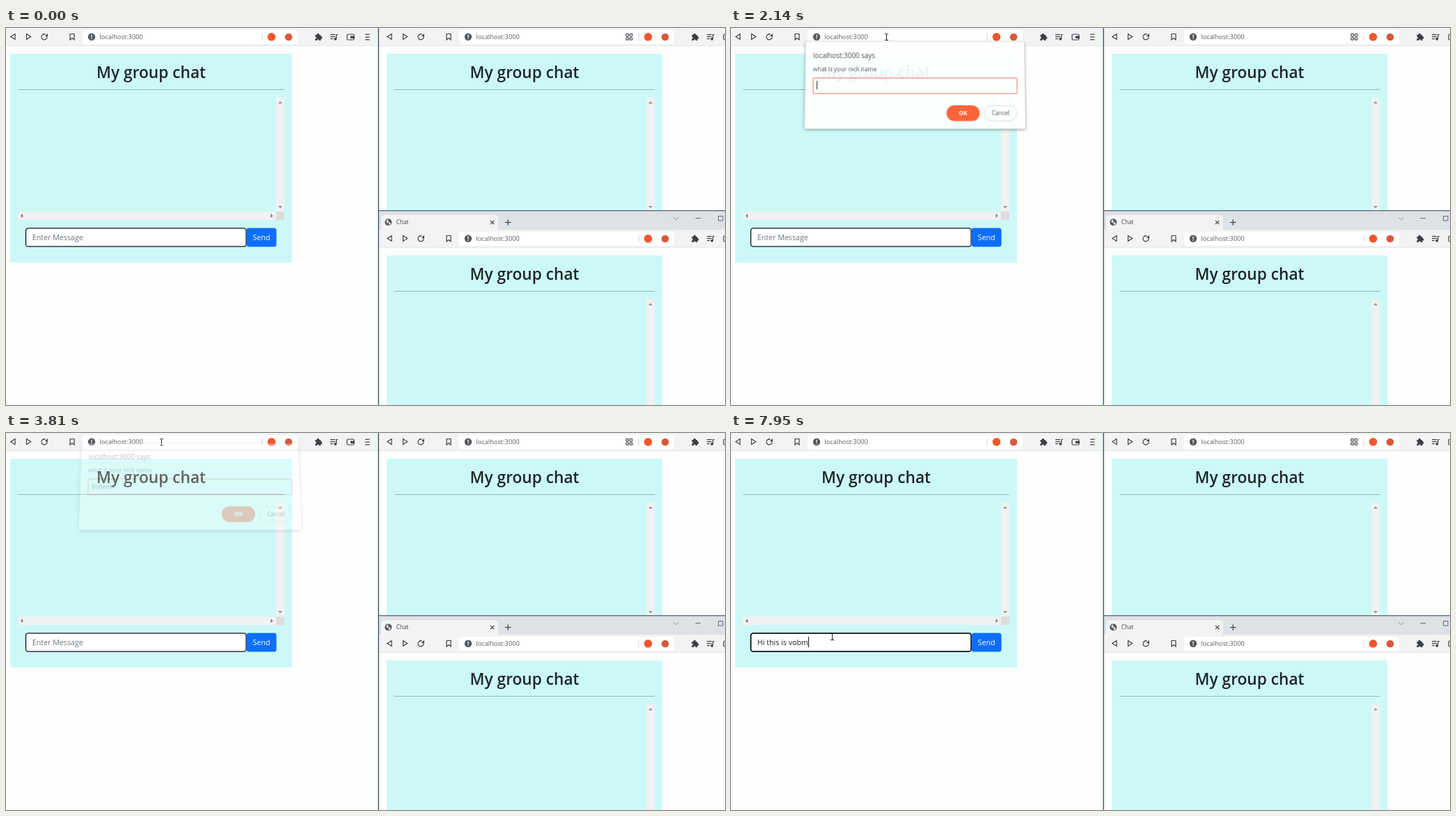
Recreate the animation shown at these times as an HTML page with a canvas. Size 1033 by 542 pixels, loop 8 s.

```html
<!DOCTYPE html>
<html lang="en">
<head>
<meta charset="utf-8">
<title>Group chat</title>
<style>
  html, body { margin: 0; width: 100%; height: 100%; overflow: hidden; background: #fefefe; }
  canvas, svg { position: absolute; left: 0; top: 0; display: block; }
  #dialog { transform-origin: 264px 86px; visibility: hidden; font-family: "Open Sans", "Noto Sans", sans-serif; }
  #panel { filter: drop-shadow(0 1px 2px rgba(0, 0, 0, .45)); }
</style>
</head>
<body>
<canvas id="stage" width="1033" height="542"></canvas>
<svg id="dialog" width="1033" height="542">
  <rect id="panel" x="106.5" y="23.5" width="315.5" height="125" rx="1.5" fill="#fff"/>
  <text x="117.5" y="47" font-size="9.9" fill="#3c4043">localhost:3000 says</text>
  <text x="117.5" y="66.5" font-size="8.57" fill="#505357">what is your nick name</text>
  <rect x="118" y="75.8" width="293" height="22.4" rx="1.5" fill="#fff" stroke="#f29a84" stroke-width="1.4"/>
  <text id="nick" x="123.3" y="90" font-size="8.6" fill="#303236"></text>
  <rect id="nickCaret" x="123" y="80" width="1" height="12" fill="#222"/>
  <rect x="309.5" y="115" width="47.5" height="22.5" rx="11.2" fill="#ff5a2c"/>
  <text x="333.2" y="129.3" font-size="8.3" font-weight="700" fill="#fff" text-anchor="middle">OK</text>
  <rect x="363.5" y="115.5" width="47" height="21.5" rx="10.7" fill="#fff" stroke="#d9dbe0"/>
  <text x="386.8" y="129.2" font-size="8.2" fill="#44474c" text-anchor="middle">Cancel</text>
</svg>
<script>
const LOOP = 8000;
const FAMILY = '"Open Sans", "Noto Sans", sans-serif';
const ctx = document.getElementById('stage').getContext('2d');
const [dialog, nick, nickCaret] = ['dialog', 'nick', 'nickCaret'].map(id => document.getElementById(id));

// Pointer moves: start, end, number of steps, way points.
const moves = [
  [190, 360, 4, [[1020, 545], [839, 440], [480, 222], [345, 139]]],
  [560, 1060, 11, [[345, 139], [404, 70], [340, 16], [126, 10], [223, 13]]],
  [4280, 4850, 12, [[223, 13], [190, 130], [145, 293]]]
];
const clicks = [[1540, 1740], [5050, 5250]];

const nickKeys = [2850, 3170, 3220, 3370, 3460];
const nickName = 'Vobem';
const messageKeys = [5510, 5710, 5810, 6060, 6140, 6230, 6310, 6390, 6480, 6560, 6640,
  6830, 6830, 6930, 7130, 7200, 7450];
const message = 'Hi this is vobm  ';
const eraseKeys = [7850, 7950];

const within = (t, [a, b]) => t >= a && t < b;
const pressed = (keys, t) => keys.filter(k => t >= k).length;

function rect(x, y, w, h, color) {
  ctx.fillStyle = color;
  ctx.fillRect(x, y, w, h);
}

function round(x, y, w, h, r, fill, stroke, width = 1) {
  ctx.beginPath();
  ctx.roundRect(x, y, w, h, r);
  if (fill) { ctx.fillStyle = fill; ctx.fill(); }
  if (stroke) { ctx.strokeStyle = stroke; ctx.lineWidth = width; ctx.stroke(); }
}

function disc(x, y, r, color) {
  ctx.beginPath();
  ctx.arc(x, y, r, 0, Math.PI * 2);
  ctx.fillStyle = color;
  ctx.fill();
}

function line(points, color = '#3c3f44', width = 1.2, close) {
  ctx.beginPath();
  points.forEach(([x, y]) => ctx.lineTo(x, y));
  if (close) ctx.closePath();
  ctx.strokeStyle = color;
  ctx.lineWidth = width;
  ctx.stroke();
}

function setFont(size, weight = 400) {
  ctx.font = `${weight} ${size}px ${FAMILY}`;
}

function text(str, x, y, size, color, weight, align = 'left') {
  setFont(size, weight);
  ctx.textAlign = align;
  ctx.fillStyle = color;
  ctx.fillText(str, x, y);
}

function widthOf(str, size) {
  setFont(size);
  return ctx.measureText(str).width;
}

// Small filled triangle pointing along (dx, dy).
function arrow(x, y, dx, dy, color) {
  ctx.beginPath();
  ctx.moveTo(x + dx * 1.6, y + dy * 1.6);
  ctx.lineTo(x - dx * 1.6 + dy * 3, y - dy * 1.6 + dx * 3);
  ctx.lineTo(x - dx * 1.6 - dy * 3, y - dy * 1.6 - dx * 3);
  ctx.fillStyle = color;
  ctx.fill();
}

function reloadIcon(x, y) {
  ctx.beginPath();
  ctx.arc(x, y, 4, -0.7, Math.PI * 1.85 - 0.7, false);
  ctx.strokeStyle = '#3c3f44';
  ctx.lineWidth = 1.3;
  ctx.stroke();
  ctx.beginPath();
  ctx.moveTo(x + 4.8, y - 5);
  ctx.lineTo(x + 4.8, y - 0.8);
  ctx.lineTo(x + 0.8, y - 0.8);
  ctx.fillStyle = '#3c3f44';
  ctx.fill();
}

function cross(x, y, r) {
  line([[x - r, y - r], [x + r, y + r]]);
  line([[x + r, y - r], [x - r, y + r]]);
}

function puzzleIcon(x, y) {
  rect(x - 4.5, y - 3, 8, 8, '#3c3f44');
  disc(x - 0.5, y - 3.3, 1.9, '#3c3f44');
  disc(x + 3.6, y + 1, 1.9, '#3c3f44');
  disc(x - 4.4, y + 1, 1.4, '#f3f3f3');
  disc(x - 0.5, y + 4.9, 1.4, '#f3f3f3');
}

function playlistIcon(x, y) {
  line([[x - 5, y - 3.5], [x + 2, y - 3.5]]);
  line([[x - 5, y - 0.5], [x + 2, y - 0.5]]);
  line([[x - 5, y + 2.5], [x - 1, y + 2.5]]);
  line([[x + 6, y - 3.5], [x + 3.6, y - 3.5], [x + 3.6, y + 2.5]]);
  disc(x + 2.2, y + 2.8, 1.9, '#3c3f44');
}

function codeIcon(x, y) {
  for (const sx of [-1, 1]) for (const sy of [-1, 1]) {
    round(x + sx * 2.7 - 1.7, y + sy * 2.7 - 1.7, 3.4, 3.4, 0.5, null, '#55585d', 1.3);
  }
}

function toolbar(dx, dy, opts = {}) {
  ctx.save();
  ctx.translate(dx, dy);
  rect(-5, 0, 540, 26, '#f3f3f3');
  rect(-5, 25, 540, 1, '#e6e7e8');
  round(110, 3, 309, 20, 4, '#fff');
  line([[13, 8.5], [6.8, 12.5], [13, 16.5]], '#3c3f44', 1.2, true);
  line([[29.5, 8.5], [35.7, 12.5], [29.5, 16.5]], '#3c3f44', 1.2, true);
  if (opts.loading) cross(55, 12.7, 3.4); else reloadIcon(55, 12.8);
  line([[92, 8.5], [98, 8.5], [98, 17], [95, 14.6], [92, 17]], '#3c3f44', 1.2, true);
  disc(123, 12.8, 5.2, '#55585d');
  rect(122.4, 9.6, 1.3, 4, '#fff');
  rect(122.4, 14.6, 1.3, 1.3, '#fff');
  text('localhost:3000', 134.3, 16.4, 9.27, '#5a5d62');
  if (opts.code) codeIcon(354.3, 12.8);
  rect(367.5, 8, 1, 10, '#cfd1d4');
  disc(381.5, 12.8, 5.8, '#f4562c');
  disc(406, 13, 5.3, '#d9583a');
  puzzleIcon(448.8, 13);
  playlistIcon(471, 13);
  round(490, 9, 10, 8, 1.5, null, '#3c3f44', 1.2);
  rect(495, 11.5, 5.6, 3.4, '#3c3f44');
  for (const y of [8.6, 12.4, 16.2]) rect(516, y, 6.5, 1.2, '#3c3f44');
  ctx.restore();
}

function card(x, y, w, h) {
  rect(x, y, w, h, '#ccf9f8');
  text('My group chat', x + w / 2, y + 35, 22.7, '#212529', 600, 'center');
  rect(x + 11, y + 51, w - 22, 1, '#95b8b9');
  const bar = x + w - 23;
  rect(bar, y + 63, 12, 164, '#f1f1f1');
  arrow(bar + 6, y + 70, 0, -1, '#8c8c8c');
  arrow(bar + 6, y + 220.5, 0, 1, '#8c8c8c');
}

function form(t) {
  rect(17, 264, 371, 12, '#f1f1f1');
  rect(388, 264, 12, 12, '#dcdcdc');
  arrow(22.5, 270, -1, 0, '#7d7d7d');
  arrow(382, 270, 1, 0, '#7d7d7d');

  const focus = t >= 5050;
  round(28.5, 287.8, 316.5, 26.4, 3.5, '#fff', '#0c1214', focus ? 1.8 : 1.3);
  round(345.5, 287.5, 43, 27, 3.5, '#0d6efd');
  text('Send', 367, 305.3, 10.7, '#fff', 400, 'center');

  const count = pressed(messageKeys, t) - pressed(eraseKeys, t);
  const typed = message.slice(0, count);
  if (typed) text(typed, 37.8, 305.3, 10.7, '#212529');
  else text('Enter Message', 37.8, 305.3, 10.7, '#6c757d');
  if (focus) rect(Math.round(37.8 + widthOf(typed, 10.7)), 293, 1, 15, '#111');
  if (typed.endsWith(' ') && t > 7000) {
    const from = 37.8 + widthOf('Hi this is ', 10.7);
    const to = 37.8 + widthOf(message.trim(), 10.7);
    const wave = [];
    for (let x = from, i = 0; x < to; x += 1.5, i++) wave.push([x, 306.5 + (i % 2)]);
    line(wave, '#e0564f', 0.8);
  }
}

function tabStrip() {
  rect(536, 263, 497, 27, '#dee1e6');
  round(539, 269, 168, 22, [5, 5, 0, 0], '#f3f3f3');
  disc(549.3, 279.3, 5, '#55585d');
  arrow(547.5, 278, -1, 0, '#e9e9ea');
  arrow(551.5, 281, 1, 0, '#e9e9ea');
  text('Chat', 560.8, 282.3, 8.2, '#44474c');
  cross(698.7, 279.5, 2.7);
  line([[717, 279.5], [725.5, 279.5]]);
  line([[721.3, 275.2], [721.3, 283.8]]);
  line([[959, 272], [962.7, 275.7], [966.4, 272]], '#888b90', 1);
  line([[990.5, 273.5], [998, 273.5]], '#66696e', 1);
  round(1023.5, 270.5, 6.5, 6.5, 0, null, '#66696e');
}

function windows(t) {
  rect(0, 0, 1033, 542, '#fefefe');
  toolbar(0, 0, { loading: within(t, [1790, 1940]) });
  card(6, 37, 405, 300);
  form(t);

  rect(536, 0, 497, 262, '#fefefe');
  toolbar(541, 0, { code: true });
  card(547, 37, 396, 225);

  rect(536, 262, 497, 280, '#fefefe');
  tabStrip();
  toolbar(541, 290);
  card(547, 327, 396, 215);
  rect(534.5, 0, 1.5, 542, '#48626b');
  rect(535, 262, 498, 1.2, '#48626b');
}

function along(points, s) {
  const p = Math.min(s, 1) * (points.length - 1);
  const i = Math.min(Math.floor(p), points.length - 2);
  const [a, b] = [points[i], points[i + 1]];
  return a.map((v, k) => v + (b[k] - v) * (p - i));
}

function pointerAt(t) {
  const move = moves.filter(m => t >= m[0]).pop();
  if (!move) return null;
  const [start, end, steps, points] = move;
  const step = Math.min(steps, 1 + Math.floor((t - start) / (end - start) * (steps - 1) + 1e-6));
  const s = step / steps;
  return along(points, steps > 4 ? s * s * (3 - 2 * s) : 0.2 + 0.8 * s);
}

function overText(x, y) {
  return (y < 24 && x > 111 && x < 368) ||
    (y > 51 && y < 76 && x > 130 && x < 287) ||
    (y > 287 && y < 315 && x > 28 && x < 345);
}

function pointer(t) {
  const at = pointerAt(t);
  if (!at) return;
  const [x, y] = at.map(Math.round);
  if (clicks.some(c => within(t, c))) disc(x - 0.7, y - 0.3, 8.4, 'rgba(255, 242, 60, .8)');
  if (overText(x, y)) {
    rect(x, y - 4, 1, 9, '#222');
    rect(x - 2, y - 5, 2, 1, '#222');
    rect(x + 1, y - 5, 2, 1, '#222');
    rect(x - 2, y + 4, 2, 1, '#222');
    rect(x + 1, y + 4, 2, 1, '#222');
    return;
  }
  const shape = [[0, 0], [0, 9.5], [2.2, 7.6], [3.8, 11], [5.2, 10.3], [3.7, 7], [6.8, 7]]
    .map(([px, py]) => [x + px + 0.5, y + py + 0.5]);
  line(shape, '#111', 1, true);
  ctx.fillStyle = '#fff';
  ctx.fill();
}

// How far the dialog is tilted away: 0 at rest.
function tilt(t) {
  if (t < 1990 || t >= 3860) return null;
  if (t < 2240) return Math.pow((2240 - (1990 + Math.floor((t - 1990) / 50) * 50)) / 192, 1.4);
  if (t < 3710) return 0;
  return [0.35, 0.72, 1][Math.floor((t - 3710) / 50)];
}

function showDialog(t) {
  const u = tilt(t);
  dialog.style.visibility = u === null ? 'hidden' : 'visible';
  if (u === null) return;
  dialog.style.opacity = Math.max(0, 1 - 0.7 * Math.pow(u, 2.7));
  dialog.style.transform = u
    ? `translateY(${-9.7 * u}px) perspective(400px) rotateX(${5.3 * u}deg)` : 'none';
  const typed = nickName.slice(0, pressed(nickKeys, t));
  nick.textContent = typed;
  nickCaret.setAttribute('x', Math.round(123.2 + widthOf(typed, 8.6)));
  nickCaret.style.display = within(t, [2550, 2850]) || t >= 3710 ? 'none' : '';
}

function tick() {
  const t = performance.now() % LOOP;
  windows(t);
  pointer(t);
  showDialog(t);
  requestAnimationFrame(tick);
}
tick();
</script>
</body>
</html>
```
